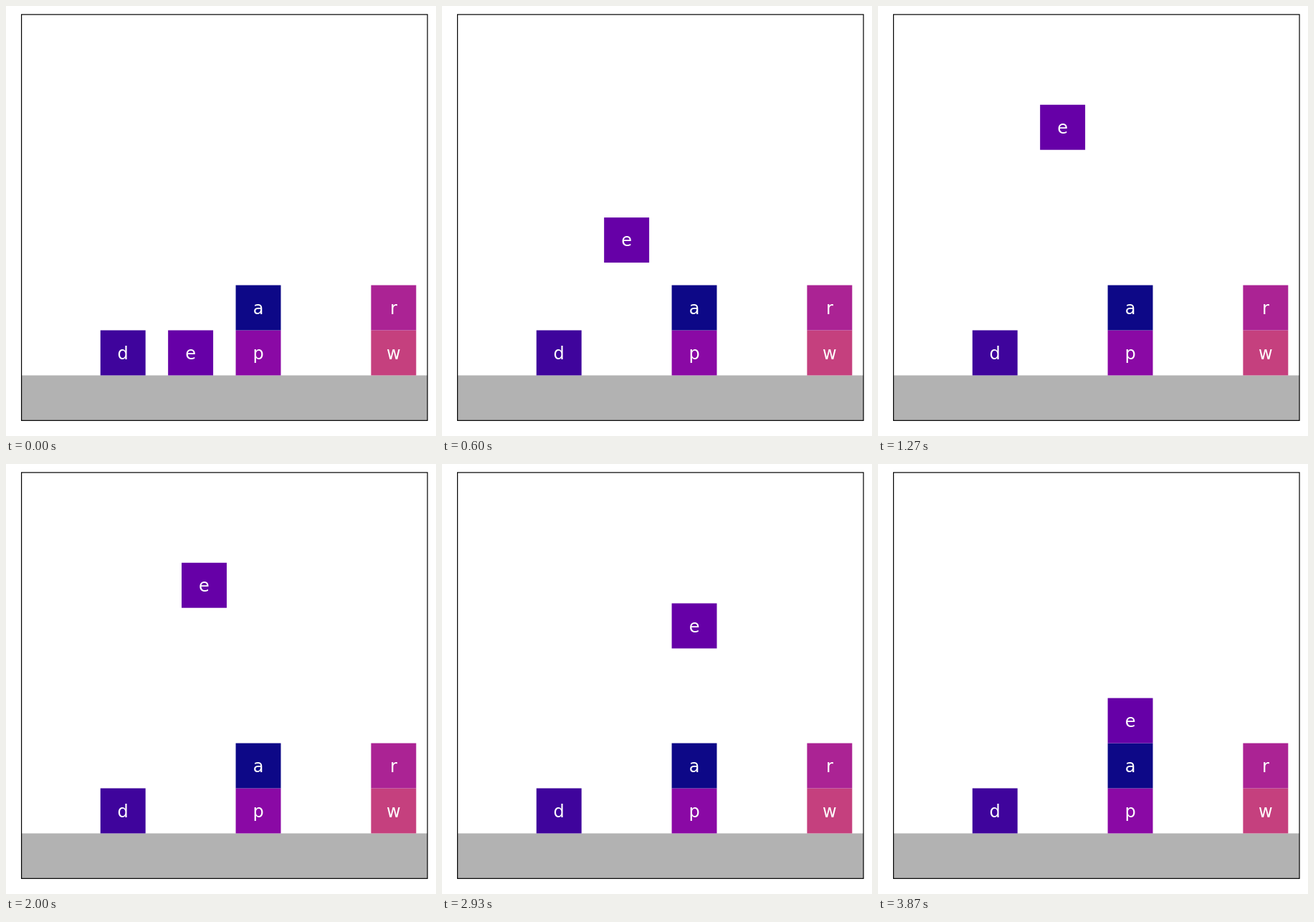
Recreate the animation shown at these times as an HTML page with a canvas. Size 600 by 600 pixels, loop 4.87 s.

```html
<!DOCTYPE html>
<html lang="en">
<head>
<meta charset="utf-8">
<title>Stacking blocks</title>
<style>
  html, body { margin: 0; width: 100%; height: 100%; overflow: hidden; background: #fff; }
  canvas { display: block; }
</style>
</head>
<body>
<canvas id="stage" width="600" height="600"></canvas>
<script>
const ctx = document.getElementById('stage').getContext('2d');
const LOOP = 4870, FPS = 15;
const UNIT = 62.94, LEFT = 21.6, TOP = 11.9, SIZE = 9;

// Block positions in units: column edge from the left, level above the floor
const blocks = [
  ['d', 1.75, 0, '#3f049c'],
  ['p', 4.75, 0, '#8a09a5'],
  ['a', 4.75, 1, '#0d0887'],
  ['w', 7.75, 0, '#c5407e'],
  ['r', 7.75, 1, '#ab2394'],
];

const clamp = v => Math.max(0, Math.min(1, v));

function drawBlock(label, col, level, color) {
  const x = LEFT + col * UNIT, y = TOP + (SIZE - 2 - level) * UNIT;
  ctx.fillStyle = color;
  ctx.fillRect(x, y, UNIT, UNIT);
  ctx.fillStyle = '#fff';
  ctx.fillText(label, x + UNIT / 2, y + UNIT / 2 + 8.7);
}

function draw(ms) {
  // Whole ticks at 15 per second, on a 10 ms clock
  const tick = Math.floor((Math.floor(ms / 10) * 10 + 4) * FPS / 1000);
  // Each move from rest begins with a double step
  const lift = tick < 1 ? 0 : clamp((tick + 1) / 20);
  const slide = tick < 30 ? 0 : clamp((tick - 28) / 10);
  const drop = clamp((tick - 38) / 20);

  ctx.fillStyle = '#fff';
  ctx.fillRect(0, 0, 600, 600);
  ctx.fillStyle = '#b2b2b2';
  ctx.fillRect(LEFT, TOP + (SIZE - 1) * UNIT, SIZE * UNIT, UNIT);
  ctx.strokeStyle = '#000';
  ctx.lineWidth = 1.2;
  ctx.strokeRect(LEFT, TOP, SIZE * UNIT, SIZE * UNIT);

  ctx.font = '24px "DejaVu Sans", sans-serif';
  ctx.textAlign = 'center';
  for (const block of blocks) drawBlock(...block);
  drawBlock('e', 3.25 + 1.5 * slide, 5 * lift - 3 * drop, '#6600a7');
}

const start = performance.now();
function loop() {
  draw((performance.now() - start) % LOOP);
  requestAnimationFrame(loop);
}
loop();
</script>
</body>
</html>
```
